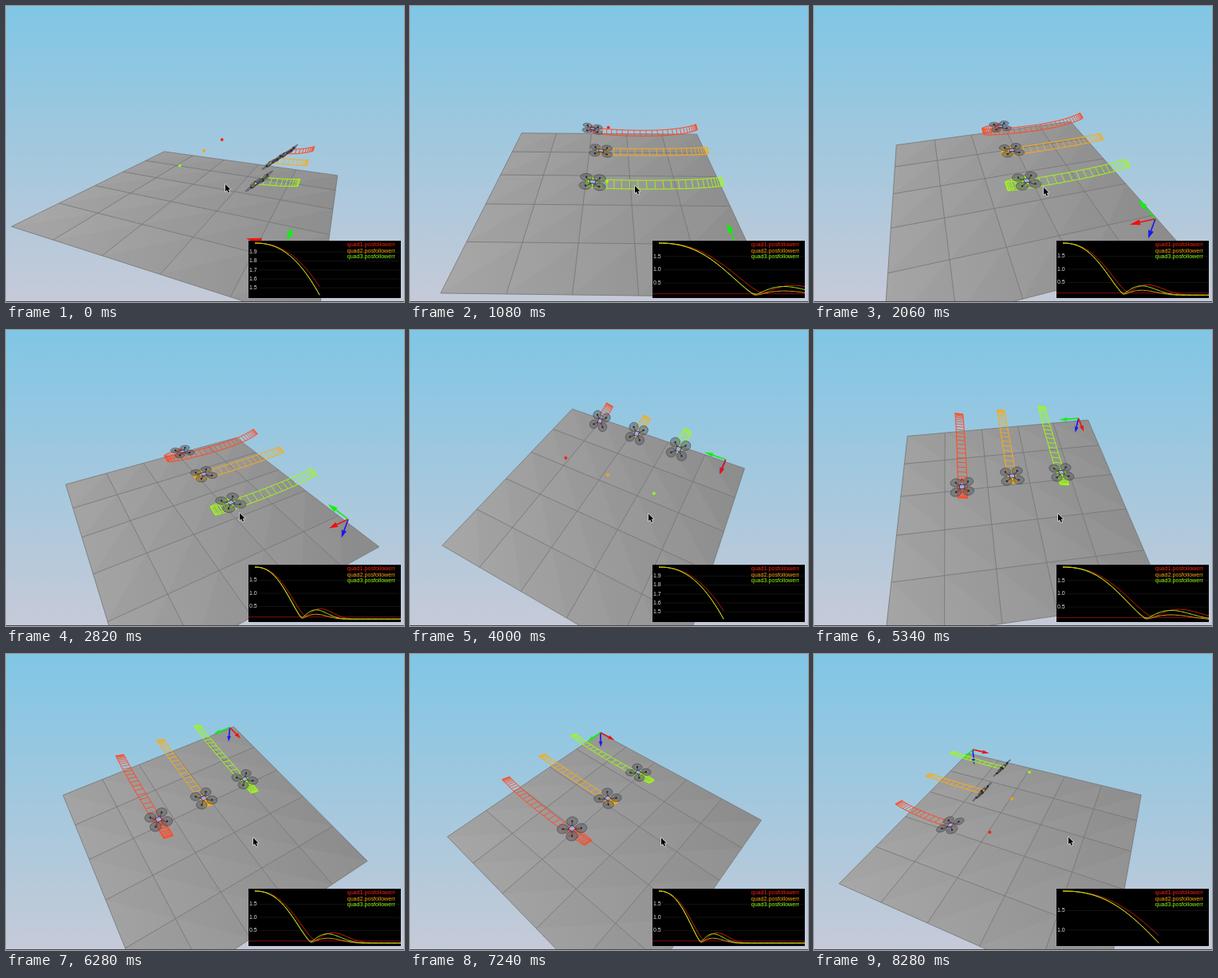
Write an HTML page with a canvas that moves like this. It is 499 by 372 pixels and loops after 8300 ms.

```html
<!DOCTYPE html>
<html lang="en">
<head>
<meta charset="utf-8">
<title>Quadrotor position control</title>
<style>
html, body { margin: 0; width: 100%; height: 100%; overflow: hidden; background: #a5c8dc; }
canvas { display: block; }
</style>
</head>
<body>
<canvas id="stage" width="499" height="372"></canvas>
<script>
const ctx = document.getElementById('stage').getContext('2d');
const LOOP = 8.3, RUN = 4, LEAD = .58;
const FOCAL = 393, DIST = 6.3, FLOOR = -1, HALF = 2.5, CX = 248, CY = 182;

// Hand-dragged orbit: time, azimuth, elevation
const orbit = [
  [0, -24.6, 16.4], [1.08, -.8, 32.3], [2.82, 28.5, 35.3], [4, 62.2, 50],
  [5.34, 97.5, 51], [6.28, 120.6, 52.6], [8.3, 157.2, 40.5]
];

// Monotone cubic through one column of the keys
function along(keys, col, t) {
  const last = keys.length - 2;
  const slope = i => {
    const k = Math.max(0, Math.min(last, i));
    return (keys[k + 1][col] - keys[k][col]) / (keys[k + 1][0] - keys[k][0]);
  };
  const tangent = i => {
    const a = slope(i - 1), b = slope(i);
    return a * b <= 0 ? 0 : 2 * a * b / (a + b);
  };
  let i = 0;
  while (i < last && t > keys[i + 1][0]) i++;
  const h = keys[i + 1][0] - keys[i][0], u = (t - keys[i][0]) / h, v = 1 - u;
  return keys[i][col] * (1 + 2 * u) * v * v + keys[i + 1][col] * u * u * (3 - 2 * u)
    + h * u * v * (tangent(i) * v - tangent(i + 1) * u);
}

const ramp = (t, a, b) => {
  const u = Math.max(0, Math.min(1, (t - a) / (b - a)));
  return u * u * (3 - 2 * u);
};

// Flight response: a damped swing from 2 m to the goal, a dip in height, and the lean that drives it
const fade = (t, span) => Math.exp(-((t / span) ** 4));
const travel = t => 2 * Math.cos(Math.PI / 2 * (t / 1.1) ** 1.15) * fade(t, 1.43);
const sag = t => (t / .9) ** 2 * Math.exp(1 - (t / .9) ** 2);
const lean = t => (.72 * ramp(t, 0, .12) - 1.72 * ramp(t, .62, .86)) * fade(t, 1.35);

const quads = [
  { name: 'quad1.posfollowerr', y: 1, rate: .93, over: 1.05, dip: .17, lag: .11, color: '#ff4a24', ink: '#ff2010', plot: '#d02010' },
  { name: 'quad2.posfollowerr', y: 0, rate: 1, over: .52, dip: .05, lag: 0, color: '#f7ac1c', ink: '#ffa010', plot: '#e8a018' },
  { name: 'quad3.posfollowerr', y: -1, rate: 1, over: .95, dip: .09, lag: 0, color: '#a0fa14', ink: '#90ff10', plot: '#b0f010' }
];

function place(q, t) {
  const x = travel(t * q.rate);
  return [x < 0 ? x * q.over : x, q.y, -q.dip * sag(t)];
}
function error(q, t) {
  const p = place(q, t);
  return Math.hypot(p[0], p[2], .02);
}

let cosA, sinA, cosE, sinE;
function aim(t) {
  const a = along(orbit, 1, t) * Math.PI / 180, e = along(orbit, 2, t) * Math.PI / 180;
  cosA = Math.cos(a); sinA = Math.sin(a);
  cosE = Math.cos(e); sinE = Math.sin(e);
}
function project([x, y, z]) {
  const right = x * cosA - y * sinA, away = x * sinA + y * cosA;
  const depth = DIST + away * cosE - z * sinE, k = FOCAL / depth;
  return [CX + right * k, CY - (away * sinE + z * cosE) * k, depth];
}

function trace(points, close) {
  ctx.beginPath();
  points.forEach(p => ctx.lineTo(p[0], p[1]));
  if (close) ctx.closePath();
}
function line(points, color, width) {
  trace(points);
  ctx.strokeStyle = color;
  ctx.lineWidth = width;
  ctx.stroke();
}
function fill(points, color) {
  trace(points, true);
  ctx.fillStyle = color;
  ctx.fill();
}
function spot([x, y], size, color) {
  ctx.fillStyle = color;
  ctx.fillRect(x - size / 2, y - size / 2, size, size);
}
const square = (r, at) => [at(-r, -r), at(r, -r), at(r, r), at(-r, r)];

function drawSky() {
  const g = ctx.createLinearGradient(0, 0, 0, 372);
  g.addColorStop(0, '#80c6e5');
  g.addColorStop(.5, '#a3c8de');
  g.addColorStop(1, '#c6cad8');
  ctx.fillStyle = g;
  ctx.fillRect(0, 0, 499, 372);
}

function drawFloor() {
  const at = (x, y) => project([x, y, FLOOR]);
  const g = ctx.createLinearGradient(40, 260, 430, 200);
  g.addColorStop(0, '#a4a4a4');
  g.addColorStop(1, '#8c8c8c');
  fill(square(HALF, at), g);
  for (let i = -HALF; i < HALF; i++)
    for (let j = -HALF; j < HALF; j++)
      fill([at(i, j), at(i + 1, j + 1), at(i, j + 1)], 'rgba(255,255,255,.03)');
  for (let i = -HALF; i <= HALF; i++) {
    line([at(i, -HALF), at(i, HALF)], '#747474', .8);
    line([at(-HALF, i), at(HALF, i)], '#747474', .8);
  }
}

function drawGoal(q) {
  const [x, y] = project([0, q.y, 0]);
  ctx.fillStyle = q.ink;
  ctx.beginPath();
  ctx.arc(x, y, 1.9, 0, 7);
  ctx.fill();
}

function drawTrail(q, t) {
  const left = [], right = [];
  const add = s => {
    const [x, y, z] = place(q, s);
    left.push(project([x, y + .09, z + .05]));
    right.push(project([x, y - .09, z]));
  };
  for (let s = 0; s < Math.min(t, 2.5); s += .05) add(s);
  add(t);
  line(left, q.color, 1);
  line(right, q.color, 1);
  left.forEach((p, i) => line([p, right[i]], q.color, .9));
}

function drawQuad(q, t) {
  const [px, py, pz] = place(q, t), a = lean(t - q.lag);
  const c = Math.cos(a), s = Math.sin(a), arm = .12;
  const at = (x, y, z = .02) => project([px + x * c - z * s, py + y, pz + x * s + z * c]);
  for (const side of [-arm, arm]) line([at(-arm, -side, 0), at(arm, side, 0)], '#3a3a3e', 1.3);
  const body = square(.05, at);
  fill(body, '#a9a9d6');
  line([...body, body[0]], '#38386a', 1);
  for (const x of [-arm, arm])
    for (const y of [-arm, arm]) {
      const ring = [];
      for (let u = 0; u <= 6.3; u += Math.PI / 9)
        ring.push(at(x + .105 * Math.cos(u), y + .105 * Math.sin(u)));
      fill(ring, 'rgba(95,98,104,.55)');
      line(ring, 'rgba(50,50,54,.7)', .7);
      spot(at(x, y), 2, '#222');
    }
  spot(at(-.07, 0), 2, q.color);
}

function drawAxis(dx, dy, dz, color) {
  const at = k => project([2.02 + dx * k, -2 + dy * k, -.47 + dz * k]);
  const o = at(0), mid = at(.3), tip = at(.5);
  line([o, mid], color, 1.6);
  const vx = tip[0] - o[0], vy = tip[1] - o[1], len = Math.hypot(vx, vy) || 1;
  const w = .05 * FOCAL / mid[2], nx = -vy / len * w, ny = vx / len * w;
  fill([tip, [mid[0] + nx, mid[1] + ny], [mid[0] - nx, mid[1] - ny]], color);
}

function drawPlot(t) {
  const count = 160, width = 183 * t / Math.max(1.31, t);
  const rows = quads.map(q => Array.from({ length: count + 1 }, (_, i) => error(q, t * i / count)));
  const low = Math.min(...rows.flat()), range = Math.max(2 - low, .004);
  const yAt = v => 298 + (2 - v) / range * 65.3;
  ctx.fillStyle = '#000';
  ctx.fillRect(304, 295, 191, 72);

  ctx.textBaseline = 'middle';
  ctx.textAlign = 'left';
  ctx.font = '7px "Liberation Sans", Arial, sans-serif';
  const step = range > 1.2 ? .5 : range > .6 ? .2 : range > .15 ? .1 : .05;
  for (let v = 2 - step; v >= low - .02 * range; v -= step) {
    const y = yAt(v);
    if (v < .01) break;
    line([[318, y], [494, y]], '#141414', 1);
    ctx.fillStyle = '#e4e4e4';
    ctx.fillText(v.toFixed(step < .1 ? 2 : 1), 305, y);
  }
  if (low < .1) line([[304, yAt(.1)], [495, yAt(.1)]], '#7c0e14', 1);
  quads.forEach((q, k) => line(rows[k].map((v, i) => [312 + width * i / count, yAt(v)]), q.plot, 1));

  ctx.font = '7.15px "Liberation Sans", Arial, sans-serif';
  ctx.textAlign = 'right';
  quads.forEach((q, i) => {
    ctx.fillStyle = q.ink;
    ctx.fillText(q.name, 488, 300.5 + i * 7.4);
  });
}

function drawCursor(t) {
  const u = t / LOOP, bow = Math.sin(Math.PI * u);
  ctx.save();
  ctx.translate(Math.round(275 + 44 * u + 3 * bow), Math.round(224 + 6 * u + 4 * bow));
  const arrow = new Path2D('M0 0V9L2 7.3 3.6 10.8 5.2 10 3.7 6.7 6.5 6.5Z');
  ctx.strokeStyle = 'rgba(255,255,255,.75)';
  ctx.lineWidth = 1.4;
  ctx.stroke(arrow);
  ctx.fillStyle = '#000';
  ctx.fill(arrow);
  ctx.restore();
}

function draw(t) {
  const run = (t + LEAD) % RUN;
  ctx.lineJoin = 'round';
  aim(t);
  drawSky();
  drawFloor();
  quads.forEach(drawGoal);
  drawAxis(0, 0, -1, '#1818f0');
  drawAxis(-1, 0, 0, '#f01010');
  drawAxis(0, 1, 0, '#10f010');
  const depth = q => project(place(q, run))[2];
  const order = [...quads].sort((a, b) => depth(b) - depth(a));
  order.forEach(q => drawTrail(q, run));
  order.forEach(q => drawQuad(q, run));
  ctx.fillStyle = '#44464e';
  ctx.fillRect(0, 371, 499, 1);
  drawPlot(run);
  drawCursor(t);
}

const start = performance.now();
function tick() {
  draw((performance.now() - start) / 1000 % LOOP);
  requestAnimationFrame(tick);
}
tick();
</script>
</body>
</html>
```
